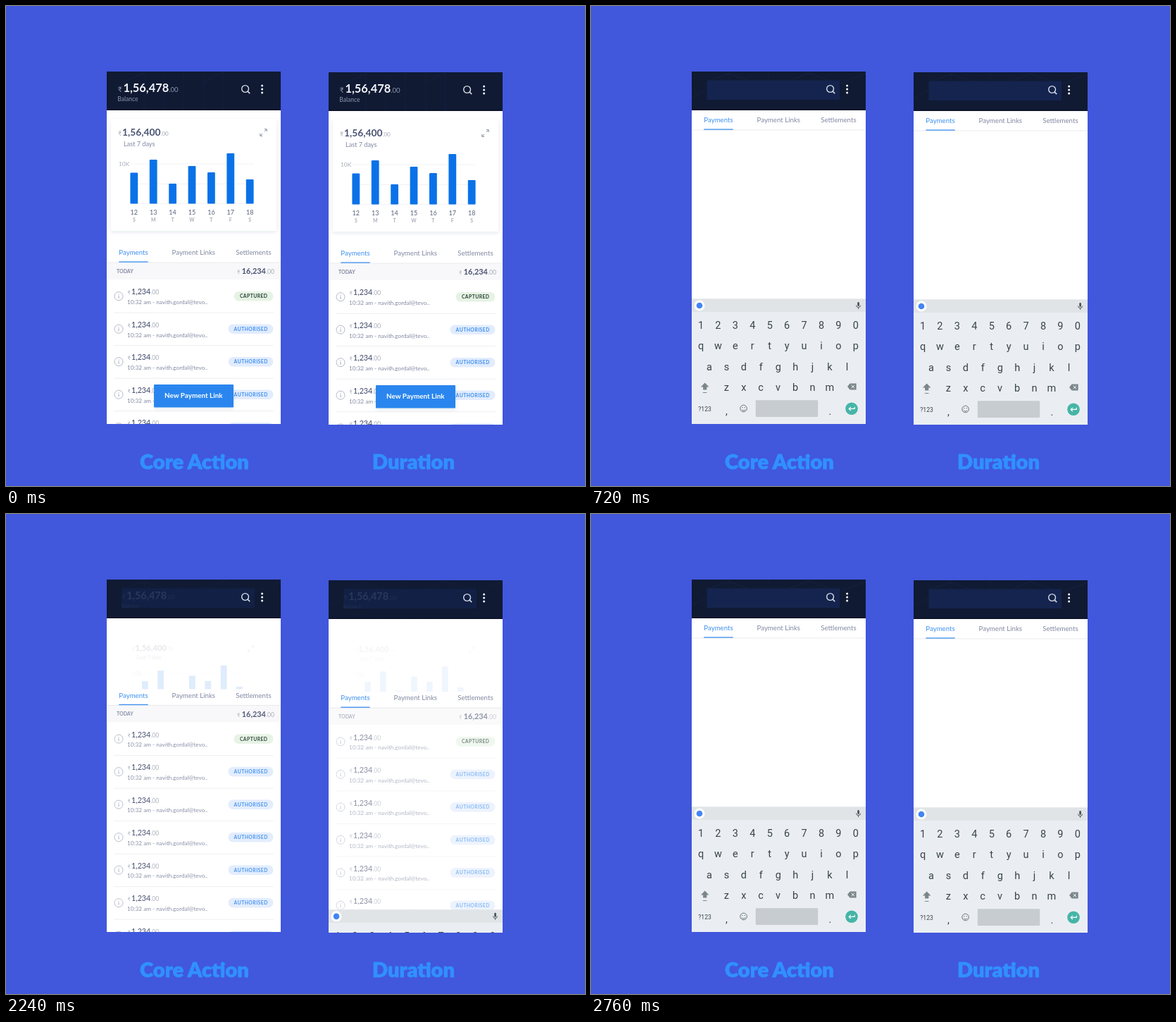
Animation of 822x681 px, one loop 3.96 s. Source, as an HTML page:

```html
<!DOCTYPE html>
<html lang="en">
<head>
<meta charset="utf-8">
<title>Search transition</title>
<style>
  html, body { margin: 0; width: 100%; height: 100%; overflow: hidden; background: #4157dc; }
  svg { display: block; width: 100vw; height: 100vh; }
  text { font-family: Lato, sans-serif; white-space: pre; }
  .keys text { font-family: Roboto, sans-serif; font-size: 14.5px; fill: #39444b; text-anchor: middle; }
  .title { font-size: 29px; font-weight: 900; fill: #3190ff; stroke: #3190ff; stroke-width: .8;
           stroke-linejoin: round; text-anchor: middle; }
</style>
</head>
<body>
<svg id="stage" viewBox="0 0 822 681"></svg>
<script>
const LOOP = 3960, TICK = 40;
const INK = '#4a5372', MUTED = '#8188a1', PALE = '#a9adba', BLUE = '#3c8ff0';

const text = (x, y, size, fill, str, extra = '') =>
  `<text x="${x}" y="${y}" font-size="${size}" fill="${fill}" ${extra}>${str}</text>`;
const rect = (x, y, w, h, fill, extra = '') =>
  `<rect x="${x}" y="${y}" width="${w}" height="${h}" fill="${fill}" ${extra}/>`;
const circle = (x, y, r, fill, extra = '') =>
  `<circle cx="${x}" cy="${y}" r="${r}" fill="${fill}" ${extra}/>`;
const path = (d, stroke, width = 1, extra = '') =>
  `<path d="${d}" fill="none" stroke="${stroke}" stroke-width="${width}" ${extra}/>`;
const mid = 'text-anchor="middle"';
const bold = 'font-weight="700"';

function amount(signX, x, y, size, value, fill, dim, weight) {
  const small = size * (size > 13 ? .59 : .8);
  return text(signX, y, size * .5 + 2, dim, '₹') +
    text(x, y, size, fill,
      `${value}<tspan font-size="${small}" font-weight="400" fill="${dim}">.00</tspan>`,
      `font-weight="${weight}"`);
}

function chart() {
  const tops = [236.5, 218, 252, 227, 236, 209, 246];
  const bars = tops.map((top, i) => {
    const x = 181.8 + 27.4 * i;
    return rect(x - 5.4, top, 10.8, 280.5 - top, '#0a72e8', 'rx="1.2"') +
      text(x, 296, 9, '#596179', 12 + i, mid) +
      text(x, 305.5, 7, PALE, 'SMTWTFS'[i], mid + bold);
  }).join('');
  return rect(149, 160, 235, 159, '#fff', 'filter="url(#soft)"') +
    amount(159, 165, 184, 13.8, '1,56,400', INK, PALE, 700) +
    text(167, 198.5, 9.1, MUTED, 'Last 7 days') +
    path('M367 178l3-3m-3.2-.3h3.4v3.4M364 181l-3 3m3.2.3h-3.4v-3.4', '#868da3') +
    text(160, 226.8, 8.4, PALE, '10K') +
    path('M176 224H352M176 252.5H352M176 280.5H352', '#eeeff3', .8) + bars;
}

function badge(y, label, x, fill, ink) {
  return rect(x, y - 6.8, 379.5 - x, 13.6, fill, 'rx="6.8"') +
    text((x + 379.5) / 2 + .2, y + 2.5, 6.8, ink, label, mid + bold + ' letter-spacing=".45"');
}

function row(i) {
  const y = 411.7 + 46.5 * i;
  return circle(160, y, 6, 'none', 'stroke="#b7bbc9"') +
    path(`M160 ${y - 3}v1.1m0 1v4`, '#a4a9ba') +
    amount(172.5, 178, y - 2.3, 10.7, '1,234', INK, PALE, 500) +
    text(172, y + 11.3, 8.2, MUTED, '10:32 am - navith.gordal@tevo..') +
    (i ? badge(y, 'AUTHORISED', 315.5, '#e2ecfd', BLUE) : badge(y, 'CAPTURED', 323.5, '#e6f3e4', '#263f34')) +
    path(`M153 ${y + 23.5}H380`, '#ebecf0', .9);
}

const panel = () =>
  rect(143, 341, 247, 460, '#fff') +
  `<g class="list">${rect(143, 364, 247, 24, '#f8f8fa')}` +
    text(157, 378.7, 7, MUTED, 'TODAY', bold) +
    amount(328, 334.8, 380.3, 10.9, '16,234', INK, PALE, 700) +
    Array.from({ length: 9 }, (_, i) => row(i)).join('') + '</g>' +
  path('M143 364H390', '#e8e9ed', .9) +
  text(160.3, 353.3, 9.7, BLUE, 'Payments') +
  text(266.3, 353.3, 9.7, MUTED, 'Payment Links', mid) +
  text(351.4, 353.3, 9.7, MUTED, 'Settlements', mid) +
  rect(160.3, 362.4, 41.4, 1.3, BLUE);

const action = () =>
  rect(210, 537, 113, 32.5, '#2a86ee', 'rx="1" filter="url(#soft)"') +
  text(266.3, 556.3, 9.9, '#fff', 'New Payment Link', mid + bold);

function keyboard() {
  const keys = (chars, x, y) => [...chars].map((c, i) => `<text x="${x + 24.43 * i}" y="${y}">${c}</text>`).join('');
  const gray = '#7b868b';
  return rect(143, 415.5, 247, 178, '#eaeef2') + rect(143, 415.5, 247, 18.5, '#e0e4e7') +
    circle(154, 425, 7.5, '#fff') + circle(154, 425, 4.3, '#4285f4') +
    rect(378.2, 420, 2.8, 6, '#4c575d', 'rx="1.4"') +
    path('M376.6 424.6a3 3 0 0 0 6 0M379.6 427.6v2.4', '#4c575d') +
    keys('1234567890', 156, 458) + keys('qwertyuiop', 156, 487) +
    keys('asdfghjkl', 168, 516.5) + keys('zxcvbnm', 192.3, 545.8) +
    `<path d="M161.7 534.5l5.8 6h-3.2v4h-5.2v-4h-3.2z" fill="${gray}"/>` +
    rect(158.8, 548, 5.6, 1, gray) +
    `<path d="M364 540l3.6-4.6h9v9.2h-9z" fill="${gray}"/>` +
    path('M369.6 537.8l4.4 4.4m0-4.4l-4.4 4.4', '#fff') +
    '<text x="161.6" y="574.5" style="font-size:8.6px">?123</text>' +
    '<text x="192.5" y="579.5">,</text><text x="339.5" y="579.5">.</text>' +
    circle(216.6, 571, 4.8, 'none', 'stroke="#5d686e" stroke-width=".9"') +
    circle(214.9, 569.6, .7, '#5d686e') + circle(218.3, 569.6, .7, '#5d686e') +
    path('M214 572.4a2.8 2.6 0 0 0 5.2 0', '#5d686e', .9) +
    rect(233.8, 559.3, 88.4, 23.6, '#c6ccd0', 'rx="1"') +
    circle(370, 571.3, 8.8, '#45b5a7') +
    path('M374.2 568.8v2.6h-8m2.6-2.6l-2.6 2.6l2.6 2.6', '#fff', 1.2);
}

const header = () =>
  rect(143, 93, 247, 55, '#101a33') + rect(143, 146.6, 247, 1.4, '#0b1227') +
  '<g class="home">' +
    path('M196 93V148M224 98V148M252 93V148M281 93V148M309 93V148M281 108L309 93M166 108L196 95', '#15244a', .7) +
    amount(158.7, 166.5, 122, 16.4, '1,56,478', '#f4f6fb', '#8d96ad', 700) +
    text(158.3, 135, 8.5, '#8d96ad', 'Balance') + '</g>' +
  '<g class="field">' +
    path('M166 106L196 96L224 106M196 93V106M252 93V106M281 106L309 95L340 106M353 110L390 96M143 130L165 118', '#182547', .7) +
    rect(164.5, 105.5, 188.5, 27.5, '#14244e') + '</g>' +
  circle(339.6, 117.5, 4.9, 'none', 'stroke="#d9dde6" stroke-width="1.4"') +
  path('M343.2 121.1l3 3', '#d9dde6', 1.5) +
  [113, 118, 123].map(y => circle(363.6, y, 1.5, '#f4f6fb')).join('');

const phone = (x, y) =>
  `<g transform="translate(${x} ${y})"><g class="phone" clip-path="url(#screen)">` +
    rect(143, 93, 247, 500, '#fff') +
    `<g class="chart">${chart()}</g><g class="panel">${panel()}</g>` +
    `<g class="action">${action()}</g><g class="keys">${keyboard()}</g>${header()}</g></g>`;

const stage = document.getElementById('stage');
stage.innerHTML =
  `<defs><clipPath id="screen">${rect(143, 93, 247, 500, '#000')}</clipPath>
   <filter id="soft" x="-20%" y="-30%" width="140%" height="170%">
     <feDropShadow dx="0" dy="2" stdDeviation="2.5" flood-color="#23345f" flood-opacity=".1"/>
   </filter></defs>` +
  rect(0, 0, 822, 681, '#4157dc') + phone(0, 0) + phone(315, 1) +
  '<text class="title" x="267.5" y="657">Core Action</text>' +
  '<text class="title" x="578.5" y="657">Duration</text>';

function bezier(x1, y1, x2, y2) {
  const at = (a, b, u) => 3 * a * u * (1 - u) ** 2 + 3 * b * u * u * (1 - u) + u ** 3;
  return x => {
    if (x <= 0 || x >= 1) return x <= 0 ? 0 : 1;
    let lo = 0, hi = 1;
    for (let i = 0; i < 24; i++) {
      const u = (lo + hi) / 2;
      if (at(x1, x2, u) < x) lo = u; else hi = u;
    }
    return at(y1, y2, lo);
  };
}
const ease = bezier(.25, .1, .25, 1), settle = bezier(0, 0, .2, 1);

// Each part: [delay, duration, easing] in slow-motion ms
const timings = [
  { slide: [0, 760], chart: [0, 375], list: [174, 570], keys: [270, 470, settle] },
  { slide: [24, 694], chart: [0, 310], list: [60, 650], keys: [128, 612] }
];
const screens = [...stage.querySelectorAll('.phone')].map((el, i) => {
  const parts = { timing: timings[i] };
  for (const name of ['chart', 'panel', 'list', 'action', 'keys', 'home', 'field'])
    parts[name] = el.querySelector('.' + name);
  return parts;
});

const fade = (el, o) => el.setAttribute('opacity', o.toFixed(4));
const move = (el, y) => el.setAttribute('transform', `translate(0 ${y.toFixed(2)})`);
const shrink = (el, x, y, s) =>
  el.setAttribute('transform', `translate(${x} ${y}) scale(${s.toFixed(4)}) translate(${-x} ${-y})`);

function draw(now) {
  const t = Math.floor(now % LOOP / TICK) * TICK;
  // First pass at full speed, second pass slowed down
  let v = t < 1920 ? (t - 405) * 2.41 : t - 2020;
  if (v > 738) v = 1000;
  const run = ([delay, length, curve = ease]) => curve((v - delay) / length);
  const search = run([0, 550]);
  for (const s of screens) {
    const { slide, chart, list, keys } = s.timing;
    const out = run(chart);
    fade(s.chart, 1 - out);
    shrink(s.chart, 266, 241, 1 - .21 * out);
    move(s.panel, -188 * run(slide));
    fade(s.list, 1 - run(list));
    fade(s.action, 1 - run([0, 200]));
    move(s.keys, 178 * (1 - run(keys)));
    fade(s.home, 1 - search);
    shrink(s.home, 205, 116, 1 - .18 * search);
    fade(s.field, search);
  }
}

function frame() {
  draw(performance.now());
  requestAnimationFrame(frame);
}
frame();
</script>
</body>
</html>
```
